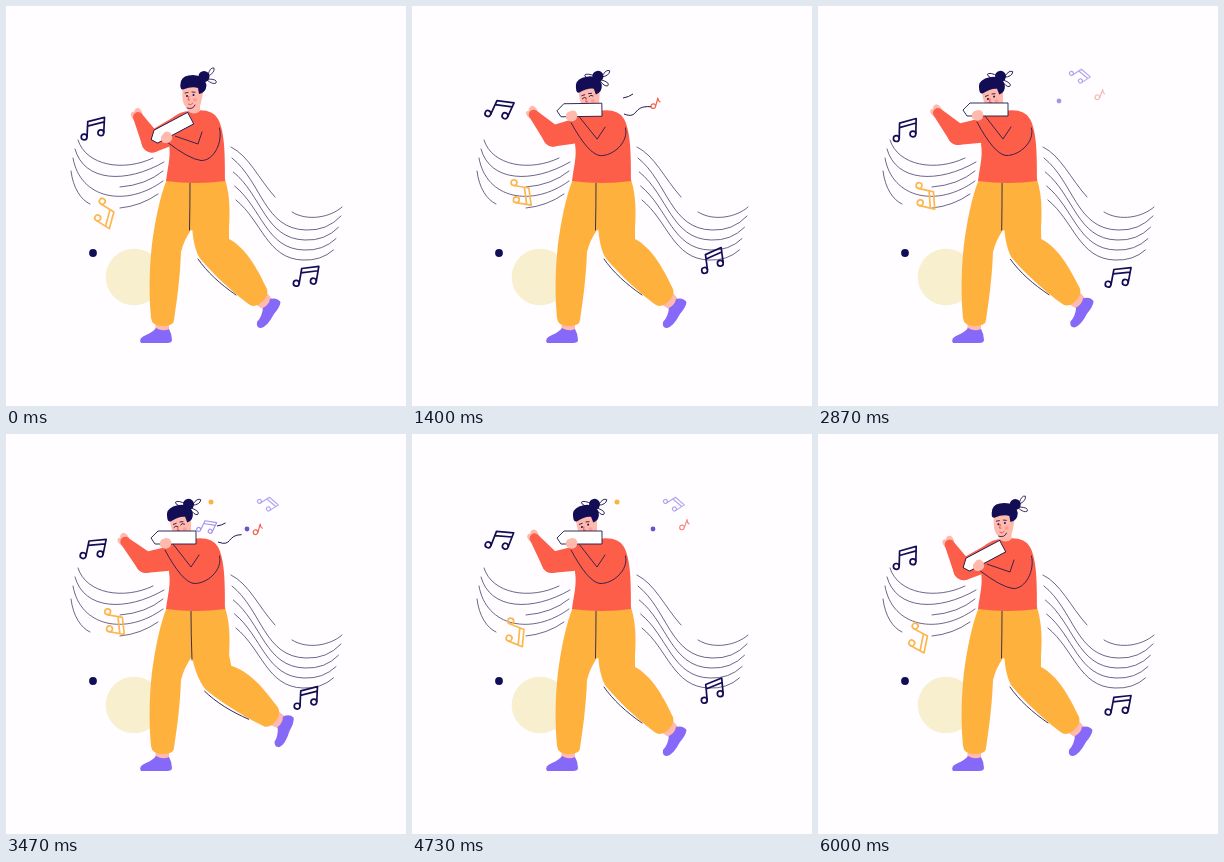
An HTML page that plays this animation: 400x400 px, repeating every 6.07 s.

```html
<!DOCTYPE html>
<html lang="en">
<head>
<meta charset="utf-8">
<title>Street musician</title>
<style>
  html, body { margin: 0; width: 100%; height: 100%; overflow: hidden; background: #fffdff; }
  svg { display: block; width: 100vw; height: 100vh; }
  .line { fill: none; stroke: #1c1848; stroke-width: .85; stroke-linecap: round; stroke-linejoin: round; }
  .staff { stroke: #45426a; stroke-width: .8; }
  .trim { fill: none; stroke: #1c1848; stroke-width: 1; }
  .red { fill: #fd5e49; }
  .skin { fill: #ffb9ad; }
  .pants { fill: #ffb13e; }
  .shoe { fill: #8669f9; }
  .navy { fill: #130d56; }
  .note { fill: none; stroke-width: 1.7; stroke-linejoin: round; }
</style>
</head>
<body>
<svg viewBox="0 0 400 400">
  <defs>
    <g id="pair">
      <circle cx="-8" cy="8" r="2.9"/>
      <circle cx="8.5" cy="3" r="2.9"/>
      <path d="M-5.1 8V-7.5L11.4-12.5V3M-5.1-3L11.4-8"/>
    </g>
    <g id="single">
      <circle cx="-1.6" cy="3.6" r="2.3"/>
      <path d="M.7 3.6L2-5Q2.5-2 5-1"/>
    </g>
  </defs>

  <circle cx="128" cy="271" r="28.3" fill="#f7efcd"/>
  <circle class="navy" cx="87" cy="247" r="3.9"/>
  <path class="line staff" d="M72 134C80 160 118 166 147 152M69 143C78 176 120 178 158 156
    M114 181Q140 179 157 165M67 152C74 193 120 202 157 175
    M65 165C67 182 75 194 84 198M114 202Q135 200 152 188"/>
  <path class="line staff" d="M225 141C243 150 252 172 269 191M286 206C302 216 325 211 336 201"/>
  <path class="line staff" id="staves"/>

  <g class="note" stroke="#130d56">
    <use href="#pair" id="noteL"/>
    <use href="#pair" id="noteR"/>
  </g>
  <use href="#pair" id="noteY" class="note" stroke="#fcb750"/>

  <g id="sparks"></g>

  <g id="leg">
    <path class="skin" d="M246 296L259 285L268 295L258 304Z"/>
    <path class="shoe" d="M257 302Q263 299 264 293Q271 291 274.500 296Q274 301 268 308Q261 321 255 322Q250 322 251 316Q256 311 257 302Z"/>
    <path class="pants" d="M186 212Q186 238 193 251C204 265 226 286 244 299Q250 302 257 295Q263 289 261 283C251 262 240 242 223 233V212Z"/>
    <path class="line" d="M192 253C201 266 214 278 230 289"/>
  </g>
  <path class="skin" d="M150 314H163V326H149Z"/>
  <path class="shoe" d="M135 337Q132 332 140 329Q147 326 150 322Q157 326 163 323Q166 328 166 334Q166 337 161 337Z"/>
  <path class="pants" d="M161 173C154 190 149 215 146 238C143 265 143 290 145 312Q146 320 156 320Q168 320 168 314C170 300 174 275 175 246Q178 234 185 224L222 235C224 212 225 192 219 173Z"/>
  <path class="line" id="fly"/>

  <path class="skin" id="palm" d="M-4 4Q-7-2-6-5Q-4-8-2-6Q0-10 4-8Q7-4 4 4Z"/>
  <path class="red" id="upper"/>
  <path class="red" id="lower"/>
  <path class="red" d="M160 175C162 160 165 150 163 138L165 113Q175 104 186 105Q206 102 212 113C219 126 219 150 219 175Q190 179 160 175Z"/>
  <path class="red" id="near"/>
  <path class="line" id="folds"/>

  <g id="head">
    <path class="skin" d="M181 95H194V105Q188 110 182 105Z"/>
    <path class="skin" d="M177 80C175 92 177 103 185 103Q194 103 195 97L198 82Z"/>
    <path class="line" d="M181 102Q187 104 189 99"/>
    <path class="line" id="bow" d="M196 71Q186 70 185 73Q187 77 196 73M202 69Q204 61 208 62Q209 67 202 70M202 73Q212 73 210 77Q207 79 201 74"/>
    <path class="navy" d="M175 75Q173 84 177 83.500Q186 80 192 82L193 88Q200 87 200.500 79Q198 69 187 69Q177 69 175 75Z"/>
    <circle class="navy" cx="198" cy="70.500" r="5.500"/>
    <g id="open">
      <circle class="navy" cx="181" cy="90" r="1"/>
      <circle class="navy" cx="187.500" cy="89" r="1"/>
    </g>
    <path class="line" id="shut" d="M179 90Q181 88 183 90M186 89Q188 87 190 89"/>
    <path class="line" d="M179 87L182 86.500M186 86L189 86.300"/>
    <path d="M183 90L182 94H184M182 98Q185 100 187 97" fill="none" stroke="#e8504e" stroke-width=".9"/>
    <circle cx="189" cy="94" r="2" fill="#ff9e98"/>
  </g>

  <g id="flute">
    <path d="M-23 1L-16-6H22V7H-19Z" fill="#fff" stroke="#1c1848" stroke-width=".9" stroke-linejoin="round"/>
    <path class="skin" d="M-14 9Q-15 3-11 2Q-5-1-3 4Q-2 6-4 10Q-9 14-14 9Z"/>
  </g>
</svg>
<script>
const LOOP = 6070, STEPS = 91;
const $ = id => document.getElementById(id);
const set = (el, attrs) => { for (const k in attrs) el.setAttribute(k, attrs[k]); };
const place = (id, x, y, r) => set($(id), { transform: `translate(${x} ${y}) rotate(${r})` });
const clamp = x => Math.min(1, Math.max(0, x));
const smooth = x => x * x * (3 - 2 * x);
const ramp = (t, start, span) => smooth(clamp((t - start) / span));
const out = x => 1 - (1 - clamp(x)) ** 2;
const mix = (a, b, k) => a + (b - a) * k;

// n swings per loop
const wave = (t, n, phase) => Math.cos(2 * Math.PI * n * t / LOOP + phase);
// 0 = flute lowered, 1 = playing
const lift = t => ramp(t, 500, 1000) * (1 - ramp(t, 4700, 1200));

// Limb between two circles
function limb(ax, ay, ra, bx, by, rb) {
  const d = Math.hypot(bx - ax, by - ay), nx = (ay - by) / d, ny = (bx - ax) / d;
  return `M${ax + nx * ra} ${ay + ny * ra}L${bx + nx * rb} ${by + ny * rb}` +
    `A${rb} ${rb} 0 0 0 ${bx - nx * rb} ${by - ny * rb}L${ax - nx * ra} ${ay - ny * ra}` +
    `A${ra} ${ra} 0 0 0 ${ax + nx * ra} ${ay + ny * ra}Z`;
}

let staves = '';
for (let i = 0; i < 4; i++) {
  const drop = 10 * i;
  staves += `M${226 + 1.3 * i} ${152 + 14 * i}C256 ${176 + 13 * i} ${258 + i} ${223 + drop} ${300 - i} ${224 + drop}` +
    `Q${321 - 2 * i} ${225 + drop} ${335 - 2.5 * i} ${210 + 11.3 * i}`;
}
set($('staves'), { d: staves });

const sparks = [];
function add(tag, attrs, update) {
  const el = document.createElementNS('http://www.w3.org/2000/svg', tag);
  set(el, attrs);
  $('sparks').append(el);
  sparks.push(t => update(el, t));
}

// Things blown out of the flute: they fly, rest and fade
function fly({ tag = 'use', attrs, first, gap, count, life, from, to, move, scale = 1, dim = 1 }) {
  for (let i = 0; i < count; i++) {
    add(tag, attrs, (el, t) => {
      const age = t - first - i * gap, k = out(age / move);
      const [x, y, r] = from.map((v, j) => mix(v, to[j], k));
      const fade = clamp((life - age) / 120) * mix(1, dim, clamp((age - move / 2) / 250));
      set(el, {
        transform: `translate(${x} ${y}) rotate(${r}) scale(${scale})`,
        opacity: age < 0 ? 0 : fade
      });
    });
  }
}

// Strokes that draw on, then wipe off along their path, twice per loop
function streak(d, first, grow, lag) {
  for (const start of [first, first + 2100]) {
    add('path', { d, class: 'trim', pathLength: 1 }, (el, t) => {
      const a = clamp((t - start - lag) / grow), b = clamp((t - start) / grow);
      set(el, { 'stroke-dasharray': `0 ${a} ${b - a} 2`, opacity: b > a ? 1 : 0 });
    });
  }
}

fly({
  attrs: { href: '#pair', class: 'note', stroke: '#a396ec' },
  first: 1470, gap: 1960, count: 2, life: 2120,
  from: [192, 96, 22], to: [261, 69, 57], move: 650, scale: .68, dim: .85
});
fly({
  attrs: { href: '#single', class: 'note', stroke: '#f4604c', style: 'stroke-width:1.2' },
  first: 1160, gap: 1005, count: 4, life: 1160,
  from: [198, 107, 0], to: [282, 88, 12], move: 750, dim: .45
});
const dots = { tag: 'circle', gap: 1100, count: 3, life: 1060, move: 380 };
fly({ ...dots, attrs: { r: 2.5, fill: '#fbb23e' }, first: 1800, from: [190, 84, 0], to: [205, 68, 0] });
fly({ ...dots, attrs: { r: 2.4, fill: '#6a52cf' }, first: 1880, from: [200, 104, 0], to: [241, 95, 0] });
streak('M205 88C222 87 207 70 229 64', 1770, 350, 350);
streak('M212 108C228 114 219 98 241 101', 1100, 320, 420);
streak('M211 92Q224 90 230 76', 1200, 480, 500);

function draw(t) {
  const slow = wave(t, 2, .55), quick = wave(t, 3, -.52);
  place('noteL', 86.5, 114 + 11 * slow, 13 - 12 * slow);
  place('noteR', 299.5, 263.5 + 8.5 * slow, 1.5 + 9.5 * slow);
  place('noteY', 104 - 6 * quick, 195.5 + 12.5 * quick, 110 + 14 * quick);

  const up = lift(t), late = lift(t - 200);
  set($('head'), { transform: `translate(${-12 * late} ${2 * late}) rotate(${-12 * late} 186 86)` });
  set($('bow'), { transform: `rotate(${32 * late} 198 70.5)` });
  const shut = up > .5 && wave(t, 2, -Math.PI / 2) > 0;
  set($('open'), { opacity: shut ? 0 : 1 });
  set($('shut'), { opacity: shut ? 1 : 0 });

  const kick = smooth(clamp(1 - Math.abs(t - 3450) / 700));
  set($('leg'), { transform: `translate(${3 * kick} ${3 * kick}) rotate(${-11 * kick} 200 235)` });
  set($('fly'), { d: `M${184 + kick} 177Q${184 + kick} 200 ${183.5 + 2.5 * kick} ${224 + 2 * kick}` });

  const wx = mix(132, 122 + 4 * quick, late), wy = mix(111, 105 - 4 * quick, late);
  const ex = mix(146, 140, late), ey = mix(136, 128.5, late);
  set($('upper'), { d: limb(173, 123, 13, ex, ey, 10.5) });
  set($('lower'), { d: limb(ex, ey, 10.5, wx, wy, 5) });
  place('palm', wx, wy, Math.atan2(wy - ey, wx - ex) * 180 / Math.PI + 100);

  // The near arm follows the flute
  const fx = mix(165, 168, up), fy = mix(122, 103, up), tilt = mix(-28, 0, up);
  place('flute', fx, fy, tilt);
  const a = tilt * Math.PI / 180;
  const cx = fx - 5 * Math.cos(a) - 10 * Math.sin(a), cy = fy + 10 * Math.cos(a) - 5 * Math.sin(a);
  const nx = mix(194, 187, up), ny = mix(146, 141, up);
  set($('near'), { d: limb(nx, ny, 9, cx, cy, 5) });
  set($('folds'), {
    d: `M213.5 122C217 136 ${nx + 14} ${ny + 9} ${nx + 1} ${ny + 8.5}Q${nx - 11} ${ny + 7} ${cx - 4} ${cy + 3}` +
      `M${cx + 4} ${cy - 3}L${nx - 2} ${ny - 8}L${nx + mix(2, 6, up)} ${ny - 20}`
  });

  sparks.forEach(update => update(t));
}

function tick() {
  const t = performance.now() % LOOP;
  draw(Math.floor(t / LOOP * STEPS) * LOOP / STEPS);
  requestAnimationFrame(tick);
}
tick();
</script>
</body>
</html>
```
